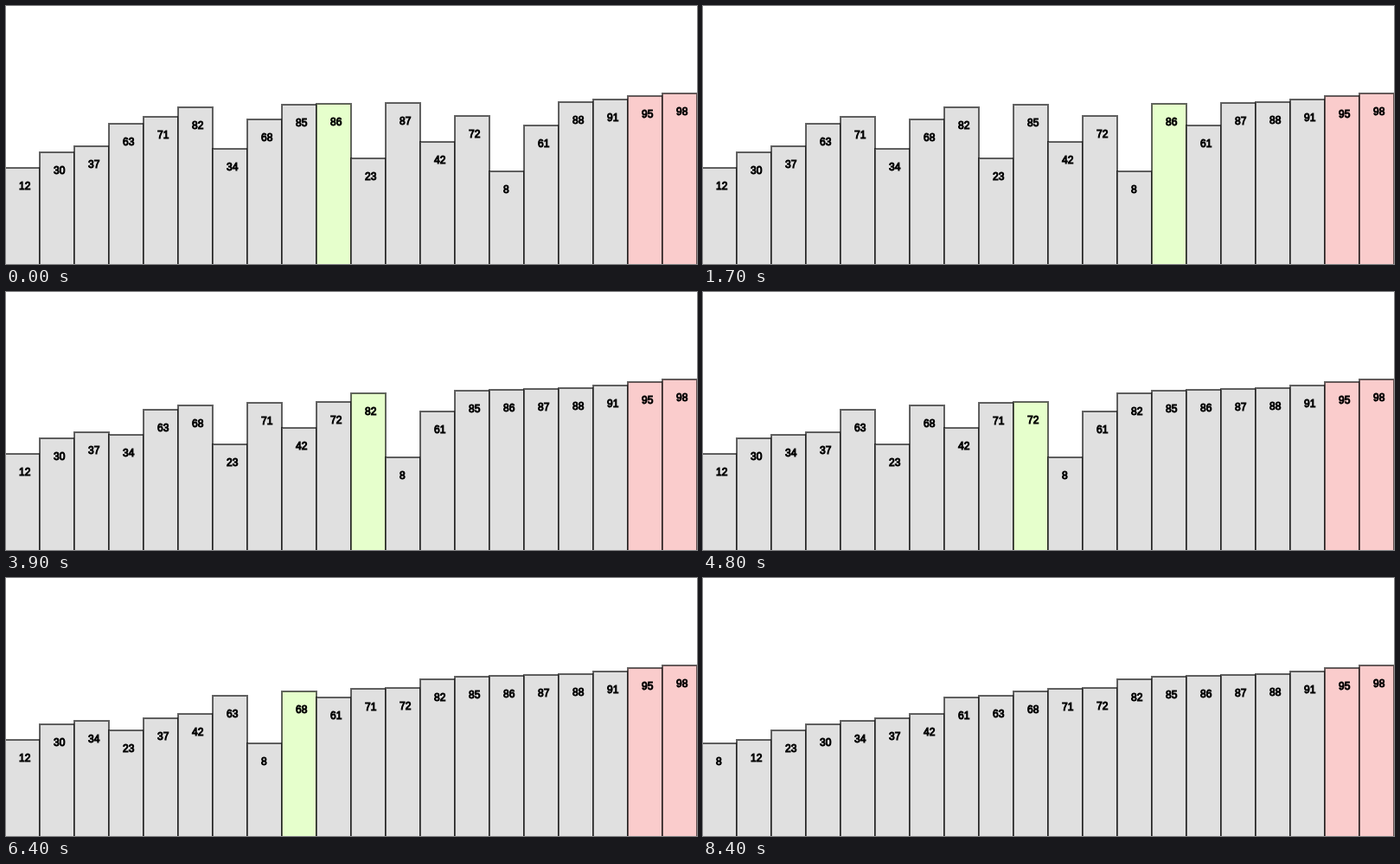
These frames come from a looping animation (799 by 298 pixels, 9.8 s). An HTML page:

```html
<!DOCTYPE html>
<html lang="en">
<head>
<meta charset="utf-8">
<title>Bubble sort</title>
<style>
  html, body { margin: 0; width: 100%; height: 100%; overflow: hidden; background: #fff; }
  svg { display: block; }
  rect { stroke: #000; stroke-opacity: .6; stroke-width: 2; }
  text { font: 12px "Liberation Sans", Arial, sans-serif; fill: #000; stroke: #000; stroke-width: 1; }
</style>
</head>
<body>
<svg id="chart" width="799" height="298" viewBox="0 0 799 298"></svg>
<script>
const LOOP = 9800, STEP = 40, BASE = 199;
const GREY = '#e0e0e0', GREEN = '#e6ffcc', RED = '#facccc';
const start = [12, 30, 37, 63, 71, 82, 34, 68, 85, 86, 23, 87, 42, 72, 8, 61, 88, 91, 95, 98];
const FIXED = 18;                                       // bars from here on are done
const quick = new Set([0, 1, 6, 12, 17, 22, 27, 33, 38, 43]); // steps of 100 ms, others 200 ms

// One state before every swap; the first pass is already under way.
function sortStates(values, from) {
  const a = values.slice(), list = [];
  let swapped = true;
  while (swapped) {
    swapped = false;
    for (let j = from; j < FIXED - 1; j++) {
      if (a[j] <= a[j + 1]) continue;
      list.push({ values: a.slice(), active: j });
      [a[j], a[j + 1]] = [a[j + 1], a[j]];
      swapped = true;
    }
    from = 0;
  }
  list.push({ values: a.slice(), active: -1 });
  return list;
}

const states = sortStates(start, 9);
states.splice(1, 1); // the opening step covers two swaps
let clock = 0;
states.forEach((s, k) => {
  s.time = clock;
  clock += quick.has(k) ? 100 : 200;
});

const chart = document.getElementById('chart');
function add(tag, attrs) {
  const el = document.createElementNS('http://www.w3.org/2000/svg', tag);
  for (const name in attrs) el.setAttribute(name, attrs[name]);
  return chart.appendChild(el);
}

const bars = start.map((_, i) => ({
  box: add('rect', { x: i * STEP - 1, width: STEP, height: 320 }),
  label: add('text', { x: i * STEP + 15 })
}));

function draw(state) {
  bars.forEach(({ box, label }, i) => {
    const v = state.values[i], top = BASE - v;
    box.setAttribute('y', top);
    box.setAttribute('fill', i >= FIXED ? RED : i === state.active ? GREEN : GREY);
    label.setAttribute('y', top + 25);
    label.textContent = v;
  });
}

let shown = -1;
const begin = performance.now();
function tick() {
  const t = (performance.now() - begin) % LOOP;
  let k = states.length - 1;
  while (k > 0 && states[k].time > t) k--;
  if (k !== shown) draw(states[shown = k]);
  requestAnimationFrame(tick);
}
tick();
</script>
</body>
</html>
```
